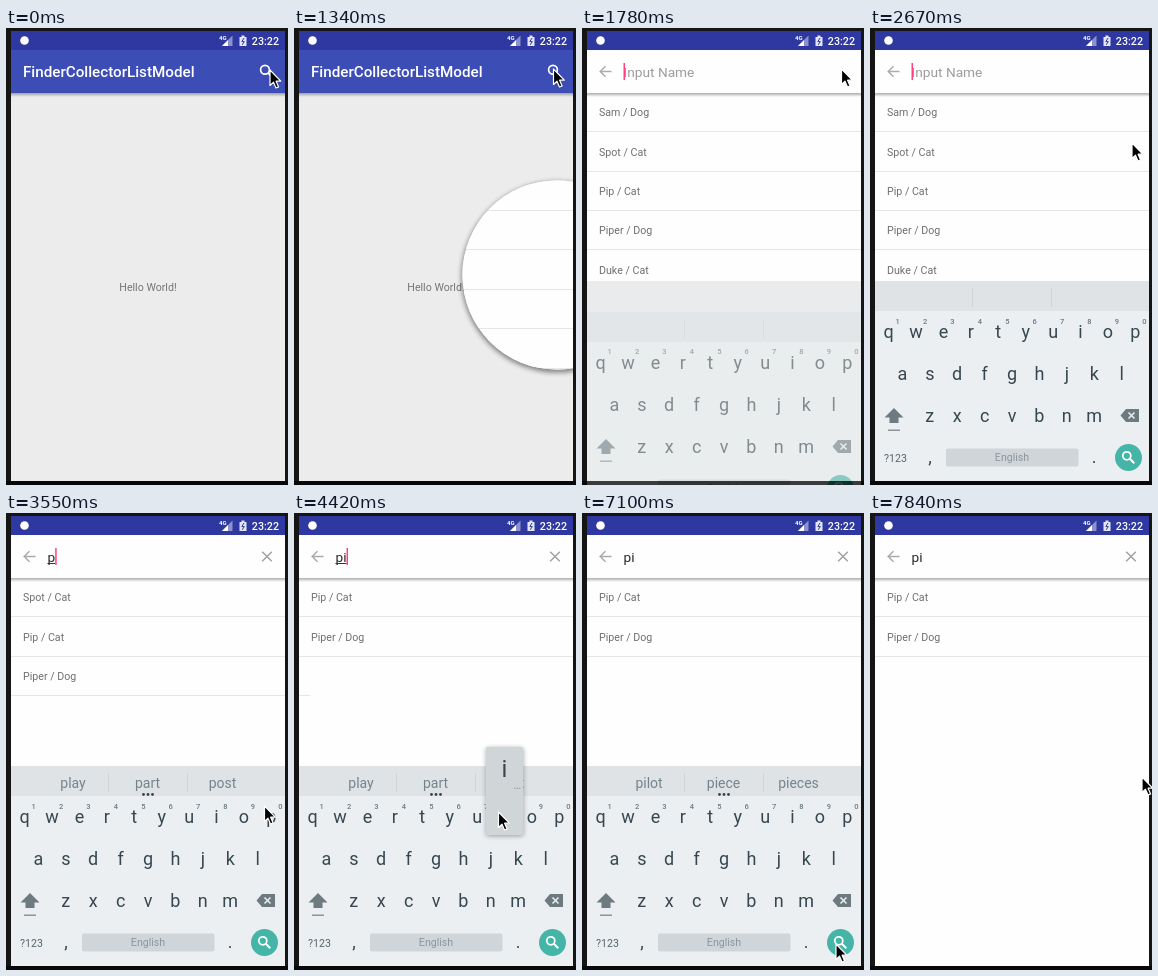
Animation of 282 by 457 pixels, one loop 7990 ms. Source, as an HTML page:

```html
<!DOCTYPE html>
<html lang="en">
<head>
<meta charset="utf-8">
<title>List filter demo</title>
<style>
html, body { margin: 0; width: 100%; height: 100%; overflow: hidden; background: #151515; }
svg { display: block; width: 282px; height: 457px; font-family: Roboto, sans-serif; }
</style>
</head>
<body>
<svg id="stage" viewBox="0 0 282 457" xmlns="http://www.w3.org/2000/svg">
  <defs>
    <linearGradient id="drop" x1="0" y1="0" x2="0" y2="1">
      <stop offset="0" stop-color="#000" stop-opacity=".32"/>
      <stop offset="1" stop-color="#000" stop-opacity="0"/>
    </linearGradient>
    <filter id="blur" x="-20%" y="-20%" width="140%" height="140%"><feGaussianBlur stdDeviation="2.5"/></filter>
    <clipPath id="screen"><rect x="5" y="22" width="274" height="431"/></clipPath>
    <clipPath id="panel"><rect x="5" y="22" width="274" height="435"/></clipPath>
    <clipPath id="hole"><circle id="holeDisc" cx="263" cy="247" r="0"/></clipPath>
  </defs>
  <rect width="282" height="457" fill="#151515"/>
  <g id="home"></g>
  <g clip-path="url(#screen)">
    <circle id="holeShade" cx="263" cy="249" r="0" opacity=".45" filter="url(#blur)"/>
    <g clip-path="url(#hole)" id="search"></g>
  </g>
  <g clip-path="url(#panel)">
    <rect id="backing" x="5" y="253" width="274" height="200" fill="#e9ebec"/>
    <g id="keyboard"></g>
  </g>
  <rect y="453" width="282" height="4" fill="#000" opacity=".6"/>
  <g id="popup"></g>
  <path id="cursor" d="M0 0V15.5L3.5 12.2L6 18L8.6 16.9L6.1 11.2H10.8Z" fill="#000" stroke="#fff" stroke-width="1.2" stroke-linejoin="round"/>
</svg>
<script>
const $ = id => document.getElementById(id);
const LOOP = 7990;

function add(parent, tag, attrs, text) {
  const el = document.createElementNS('http://www.w3.org/2000/svg', tag);
  for (const k in attrs) el.setAttribute(k, attrs[k]);
  if (text !== undefined) el.textContent = text;
  parent.appendChild(el);
  return el;
}
const set = (el, k, v) => el.setAttribute(k, v);
const show = (el, on) => set(el, 'visibility', on ? 'visible' : 'hidden');
const rect = (p, x, y, width, height, fill, more) => add(p, 'rect', { x, y, width, height, fill, ...more });
const line = (p, d, stroke, width, more) =>
  add(p, 'path', { d, stroke, 'stroke-width': width, fill: 'none', ...more });
const label = (p, x, y, size, fill, text, more) =>
  add(p, 'text', { x, y, 'font-size': size, fill, ...more }, text);
const mid = { 'text-anchor': 'middle' };

// Home screen
const home = $('home');
rect(home, 5, 3, 274, 19, '#2f38a0');
rect(home, 5, 22, 274, 43, '#3c4db6');
rect(home, 5, 65, 274, 388, '#ececec');
rect(home, 5, 65, 274, 4, 'url(#drop)');
add(home, 'circle', { cx: 18.5, cy: 12.5, r: 4.3, fill: '#fff' });
label(home, 213, 11.5, 6, '#fff', '4G', { 'font-weight': 700 });
add(home, 'path', { d: 'M216 18H226.500V7.500Z', fill: '#fff', opacity: .45 });
add(home, 'path', { d: 'M216 18H222V12Z', fill: '#fff' });
add(home, 'path', { d: 'M233.500 9H235.500V7.500H238.500V9H240.500V18H233.500Z', fill: '#e4e6f5' });
line(home, 'M238 10L235.800 13.600H238.300L236.200 16.800', '#2f38a0', 1);
label(home, 273, 16.8, 10.7, '#fff', '23:22', { 'text-anchor': 'end', 'font-weight': 500 });
label(home, 17, 49, 15.2, '#fff', 'FinderCollectorListModel', { 'font-weight': 500 });
add(home, 'circle', { cx: 259, cy: 41.8, r: 4.4, fill: 'none', stroke: '#fff', 'stroke-width': 1.7 });
line(home, 'M262.200 45L267 49.800', '#fff', 1.9);
label(home, 142, 263.3, 10.65, '#757575', 'Hello World!', mid);

// Search screen with its list
const search = $('search');
rect(search, 5, 22, 274, 431, '#fefefe');
const pets = ['Sam / Dog', 'Spot / Cat', 'Pip / Cat', 'Piper / Dog', 'Duke / Cat',
  'Max / Dog', 'Charlie / Cat', 'Buddy / Dog', 'Lucy / Cat', 'Toby / Dog'];
const ROW = 39.35;
const rows = pets.map((name, i) => {
  const g = add(search, 'g', {});
  rect(g, 5, 1, 274, 38, '#fefefe');
  label(g, 17, 24, 10.65, '#6f6f6f', name);
  rect(g, 5, 39, 274, 1, '#e6e6e6');
  return { name: name.split(' ')[0].toLowerCase(), g, i };
});
rows.filter(r => r.name.includes('p')).forEach(r => search.appendChild(r.g));
rows.filter(r => r.name.includes('pi')).forEach(r => search.appendChild(r.g));
const stub = rect(search, 5, 182, 11, 1, '#e6e6e6');
rect(search, 5, 22, 274, 43, '#fefefe');
const barShade = rect(search, 5, 65, 274, 4, 'url(#drop)');
line(search, 'M29.500 43.500H18.500M23.500 38.200L18.200 43.500L23.500 48.800', '#acacac', 1.5);
const clear = line(search, 'M256.200 38.700L265.800 48.300M265.800 38.700L256.200 48.300', '#a2a2a2', 1.5);
const hint = label(search, 41.5, 48.5, 13.7, '#9c9c9c', 'Input Name');
const typed = label(search, 41.5, 48.5, 13.7, '#262626', '');
const under = rect(search, 41.5, 50, 8, 1, '#333');
const caret = rect(search, 41.5, 35, 1.5, 17, '#ff4081');

// Keyboard
const kb = $('keyboard');
rect(kb, 5, 253, 274, 30, '#dfe3e6');
rect(kb, 5, 283, 274, 170, '#eceff1');
for (const x of [102, 181]) rect(kb, x, 260, 1, 19, '#cdd3d6');
const words = [67, 141.5, 216.5].map(x => label(kb, x, 274.7, 14, '#75848b', '', mid));
const dots = add(kb, 'g', {});
for (const x of [137.5, 142, 146.5]) add(dots, 'circle', { cx: x, cy: 281.5, r: 1.4, fill: '#37474f' });
const KEY = 27.4, INK = '#37474f';
[['qwertyuiop', 18.7, 310], ['asdfghjkl', 32.4, 352], ['zxcvbnm', 59.8, 394]].forEach(([keys, x0, y], r) =>
  [...keys].forEach((k, i) => {
    const x = x0 + i * KEY;
    label(kb, x, y, 18, INK, k, mid);
    if (!r) label(kb, x + 9, 295.5, 7.5, '#6c7a81', (i + 1) % 10, { ...mid, 'font-weight': 500 });
  }));
add(kb, 'path', { d: 'M24 380L33.500 389.500H28.500V395H19.500V389.500H14.500Z', fill: '#6d7a80' });
rect(kb, 18, 401.5, 12, 1.5, '#8b969b');
add(kb, 'path', { d: 'M250.500 387.500L256 381H269V394H256Z', fill: '#6d7a80' });
line(kb, 'M258.500 384.500L264.500 390.500M264.500 384.500L258.500 390.500', '#eceff1', 1.5);
label(kb, 25.5, 433.6, 10.6, '#56646b', '?123', mid);
label(kb, 60, 435, 18, INK, ',', mid);
rect(kb, 76, 420.5, 132.5, 18, '#cfd5d8', { rx: 2 });
label(kb, 142, 433.2, 10.6, '#8a969c', 'English', mid);
label(kb, 224, 435, 18, INK, '.', mid);
const go = add(kb, 'circle', { cx: 258.5, cy: 429.5, r: 13.5, fill: '#45b5a8' });
add(kb, 'circle', { cx: 256.8, cy: 427.8, r: 4, fill: 'none', stroke: '#fff', 'stroke-width': 1.7 });
line(kb, 'M259.800 430.800L264.300 435.300', '#fff', 2);

// Pressed key preview
const popup = $('popup');
rect(popup, -18, 235, 37, 88, '#000', { rx: 2, opacity: .35, filter: 'url(#blur)' });
rect(popup, -18.5, 234, 37.5, 88, '#d0d5d8', { rx: 2 });
const popKey = label(popup, 0, 264, 24, INK, '', mid);
label(popup, 13, 275.5, 12, '#89959a', '…', mid);

// [time, x, y] of the pointer tip
const path = [
  [0, 264, 42], [300, 264, 42], [440, 262, 45], [590, 257, 47], [740, 253, 46], [890, 256, 43],
  [1040, 259.5, 41], [2370, 259.5, 41], [2660, 262, 115], [2960, 261, 225], [3250, 258.5, 293],
  [3690, 258.5, 293], [3830, 250, 297], [4120, 206, 300], [4420, 204.5, 299], [4870, 204.5, 299],
  [5020, 235, 325], [5170, 268, 339], [5320, 271, 300], [5470, 263.5, 262], [6070, 263.5, 262],
  [6360, 269, 330], [6650, 254, 431], [7540, 254, 431], [7690, 267, 345], [7840, 272, 264], [LOOP, 272, 264]
];
// Bursts of activity: start, end, number of steps
const bursts = [[440, 1040, 5], [1340, 2370, 8], [2520, 3550, 8], [3690, 4570, 7],
  [5020, 5470, 4], [6070, 7100, 8], [7240, 7390, 2], [7690, 7840, 2]];
const ticks = [0];
for (const [a, b, n] of bursts)
  for (let i = 0; i < n; i++) ticks.push(Math.floor((a + (b - a) * i / (n - 1)) / 10 + 1e-6) * 10);

const blinks = [[1600, 2070], [2650, 3100], [3390, 3830], [4270, 5020], [5470, 6070], [6500, 6950]];
const TYPE_P = 3330, TYPE_I = 4200;
const within = (t, a, b) => t >= a && t < b;
const unit = v => Math.max(0, Math.min(1, v));
const mix = (a, b, p) => a + (b - a) * p;

function pointAt(t) {
  const k = Math.max(1, path.findIndex(p => p[0] >= t));
  const [t0, x0, y0] = path[k - 1], [t1, x1, y1] = path[k];
  const p = unit((t - t0) / (t1 - t0));
  return [mix(x0, x1, p), mix(y0, y1, p)];
}

function placeRows(t) {
  const [from, to, start] = t < TYPE_I ? ['', 'p', TYPE_P] : ['p', 'pi', TYPE_I];
  const p = unit((t - start) / 150), ease = p * p * (3 - 2 * p);
  const rank = (r, q) => r.name.includes(q) ? rows.filter(o => o.i < r.i && o.name.includes(q)).length : -1;
  for (const r of rows) {
    const a = rank(r, from), b = rank(r, to);
    const y = b < 0 ? a : mix(a, b, ease);
    show(r.g, a >= 0 && (b >= 0 || p < 1));
    set(r.g, 'opacity', b < 0 ? 1 - p : 1);
    set(r.g, 'transform', `translate(0 ${Math.round(64.4 + y * ROW)})`);
  }
}

function placeKeyboard(t) {
  const rising = within(t, 1700, 1900), falling = within(t, 7200, 7380);
  show(kb, within(t, 1700, 7380));
  show(backing, rising);
  set(kb, 'transform', `translate(0 ${rising ? mix(64, 0, (t - 1700) / 155) : falling ? (t - 7200) * 2.4 : 0})`);
  set(kb, 'opacity', rising || falling ? .58 : 1);
  const list = t < TYPE_P ? ['', '', ''] : t < 4560 ? ['play', 'part', 'post'] : ['pilot', 'piece', 'pieces'];
  words.forEach((w, i) => { w.textContent = list[i]; });
  dots.style.display = t < TYPE_P ? 'none' : '';
  set(go, 'fill', within(t, 6790, 6950) ? '#37958b' : '#45b5a8');
}

const backing = $('backing');
function draw(now) {
  const t = ticks.filter(k => k <= now).pop();
  const r = t < 1340 ? 0 : Math.min(370, (t - 1240) * 227 / 240);
  set($('holeDisc'), 'r', r);
  set($('holeShade'), 'r', r ? r + 1 : 0);
  show(barShade, r > 345);
  placeRows(t);
  placeKeyboard(t);

  const text = t < TYPE_P ? '' : t < TYPE_I ? 'p' : 'pi';
  typed.textContent = text;
  const w = text ? typed.getComputedTextLength() : 0;
  show(hint, !text);
  show(clear, text);
  show(stub, within(t, 4400, 4560));
  set(under, 'width', w);
  show(under, text && t < 6940);
  set(caret, 'x', 41.5 + w);
  show(caret, blinks.some(([a, b]) => within(t, a, b)));

  const key = within(t, 3240, 3540) ? 'p' : within(t, 4260, 4560) ? 'i' : '';
  show(popup, key);
  popKey.textContent = key;
  set(popup, 'transform', `translate(${key === 'p' ? 260 : 210.3} 0)`);
  set($('cursor'), 'transform', `translate(${pointAt(t)})`);
}

const began = performance.now();
function loop() {
  draw((performance.now() - began) % LOOP);
  requestAnimationFrame(loop);
}
loop();
</script>
</body>
</html>
```
